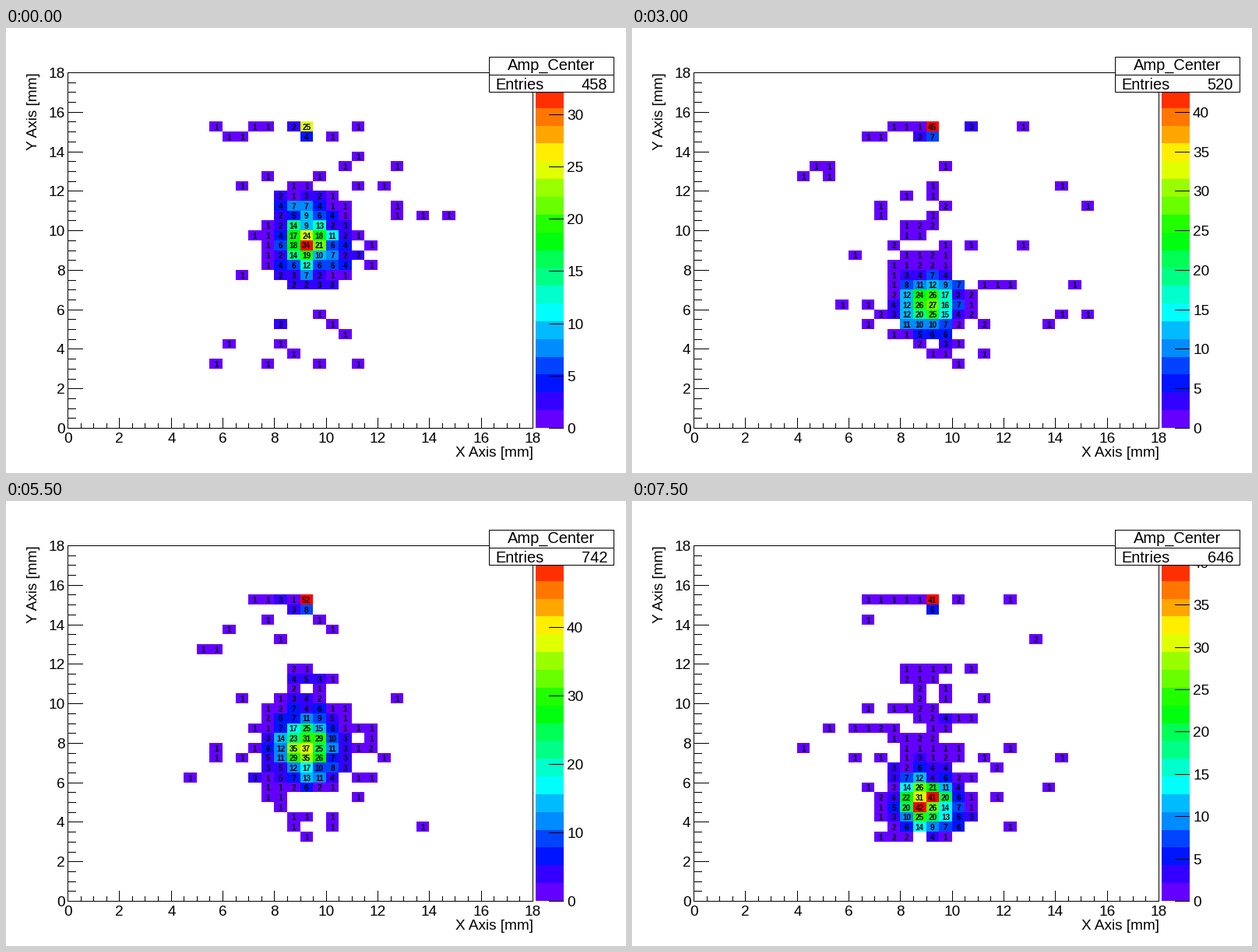
These frames come from a looping animation (796 px wide and 572 px high, 8 s). A matplotlib script:

```python
import colorsys

import matplotlib.pyplot as plt
import numpy as np
from matplotlib.animation import FuncAnimation
from matplotlib.colors import ListedColormap
from matplotlib.patches import Rectangle

W, H, DPI = 796, 572, 100
PX = 72 / DPI  # points per pixel
LEFT, RIGHT, TOP, BOTTOM = 79, 676, 57, 514
BINS, SPAN = 36, 18
BAR_X, BAR_W, LEVELS = 680, 36, 20
RUNS = 16

# Key points of the scan; the runs between them are interpolated.
KEY_RUN = [0, 1, 2, 6, 8, 9, 11, 14, 15]
BEAM_Y = [9.35, 9.4, 9.4, 6.25, 9.3, 9.25, 7.75, 5.75, 4.95]
ENTRIES = [458, 436, 518, 520, 615, 658, 742, 686, 646]
HOT = [25, 25, 37, 45, 45, 36, 52, 55, 41]
PEAK = [34, 24, 25, 27, 38, 47, 37, 43, 42]


def at(run, values):
    return float(np.interp(run, KEY_RUN, values))


def px_x(mm):
    return LEFT + mm * (RIGHT - LEFT) / SPAN


def px_y(mm):
    return BOTTOM - mm * (BOTTOM - TOP) / SPAN


def rainbow(level):
    step = int((level + 0.99) * 50 / LEVELS) + 1
    return colorsys.hls_to_rgb((280 - 5.6 * step) / 360, 0.5, 1)


PALETTE = ListedColormap([rainbow(k) for k in range(LEVELS)])
MESH = dict(cmap=PALETTE, vmin=-0.5, vmax=LEVELS - 0.5, zorder=1)
EDGES = np.arange(BINS + 1) * SPAN / BINS
EDGE_X = np.floor(px_x(EDGES) + 0.5)
EDGE_Y = np.floor(px_y(EDGES) + 0.5)
MIDS = (EDGES[:-1] + EDGES[1:]) / 2


def histogram(run):
    """Counts[row, column]: beam core, halo with upward trail, strays, hot cell."""
    rng = np.random.default_rng(100 + run)
    entries, hot, peak = (round(at(run, v)) for v in (ENTRIES, HOT, PEAK))
    cy = at(run, BEAM_Y)
    cx = 8.5 + 0.09 * cy
    sx, sy = 0.62, 0.45 + 0.05 * cy

    gx = np.exp(-((MIDS - cx) / sx) ** 2 / 2)
    gy = np.exp(-((MIDS - cy) / sy) ** 2 / 2)
    core = np.outer(gy, gx)
    core *= 0.6 * entries / core.sum()
    noise = 0.6 * np.sqrt(core) * rng.standard_normal(core.shape)
    counts = np.maximum(np.rint(core + noise), 0).astype(int)

    strays = 42
    halo = max(entries - counts.sum() - hot - hot // 6 - strays, 0)
    trail = halo // 4
    row_hits = strays // 6
    x = np.concatenate([
        rng.normal(cx, 0.95, halo - trail),
        rng.normal(9.1, 0.5, trail),
        rng.normal(9.2, 2.7, strays),
    ])
    y = np.concatenate([
        rng.normal(cy, 1.2, halo - trail),
        rng.uniform(cy, 11.8, trail),
        rng.uniform(15, 15.5, row_hits),
        rng.uniform(3, 15, strays - row_hits),
    ])
    keep = (x >= 4) & (x < 15.5) & (y >= 3) & (y < 15.5)
    cols, rows = (x[keep] * 2).astype(int), (y[keep] * 2).astype(int)
    np.add.at(counts, (rows, cols), 1)

    counts = np.minimum(counts, peak - 1)
    counts[int(cy * 2), int(cx * 2)] = peak
    counts[29:31, 17] = rng.integers(0, 4, 2)
    counts[30, 18], counts[29, 18] = hot, hot // 6
    return counts, entries


fig = plt.figure(figsize=(W / DPI, H / DPI), dpi=DPI, facecolor="white")
ax = fig.add_axes([0, 0, 1, 1])
ax.axis("off")


def label(x, y, text, size=19, ha="center", z=3, **kw):
    return ax.text(x, y, text, fontsize=size * PX, family="Liberation Sans",
                   ha=ha, va="baseline", zorder=z, **kw)


def line(x0, y0, x1, y1, z=2):
    return ax.plot([x0 + 0.5, x1 + 0.5], [y0 + 0.5, y1 + 0.5], color="black",
                   lw=PX, zorder=z, solid_capstyle="projecting",
                   snap=False)[0]


def box(x0, y0, x1, y1, fill, z):
    ax.add_patch(Rectangle((x0 + 0.5, y0 + 0.5), x1 - x0, y1 - y0, lw=PX,
                           ec="black", fc=fill, zorder=z, snap=False))


def draw_axes():
    box(LEFT, TOP, RIGHT, BOTTOM, "none", 2)
    for k in range(2 * SPAN + 1):
        mm, major = k / 2, k % 4 == 0
        x, y = round(px_x(mm)), round(px_y(mm))
        line(x, BOTTOM, x, BOTTOM - (13 if major else 6))
        line(LEFT, y, LEFT + (19 if major else 10), y)
        if major:
            label(x + 0.5, 533, f"{k // 2}")
            label(75.5, y + 7, f"{k // 2}", ha="right")
    label(677, 551, "X Axis [mm]", ha="right")
    label(40, 57, "Y Axis [mm]", ha="right", rotation=90,
          rotation_mode="anchor")


def draw_bar():
    edges = np.rint(np.linspace(BOTTOM, TOP, LEVELS + 1))
    ax.pcolormesh([BAR_X, BAR_X + BAR_W], edges,
                  np.arange(LEVELS)[:, None], **MESH)


def draw_stats():
    box(620, 37, 780, 82, "white", 5)
    line(620, 60, 780, 60, 6)
    label(700.5, 54, "Amp_Center", 20, z=6)
    label(628, 79, "Entries", 20, "left", z=6)
    return label(772, 79, "", 20, "right", z=6)


draw_axes()
draw_bar()
entries_text = draw_stats()
ax.set_xlim(0, W)
ax.set_ylim(H, 0)
live = []


def draw(run):
    while live:
        live.pop().remove()
    counts, entries = histogram(run)
    top = counts.max()

    level = np.minimum((0.01 + counts * LEVELS / top).astype(int), LEVELS - 1)
    live.append(ax.pcolormesh(EDGE_X, EDGE_Y,
                              np.ma.masked_where(counts == 0, level), **MESH))
    for row, col in np.argwhere(counts):
        live.append(label(px_x(MIDS[col]), px_y(MIDS[row]) + 4.3,
                          f"{counts[row, col]}", 10, weight="bold"))

    step = 2 if top <= 25 else 5 if top <= 50 else 10
    for value in range(0, top + 1, step):
        y = round(BOTTOM - (BOTTOM - TOP) * value / top)
        live.append(line(BAR_X + 17, y, BAR_X + BAR_W - 1, y))
        live.append(label(720, y + 7, f"{value}", ha="left"))

    entries_text.set_text(f"{entries}")
    return live


anim = FuncAnimation(fig, draw, frames=RUNS, interval=500,
                     init_func=lambda: draw(0), repeat=True, repeat_delay=0,
                     blit=False)
plt.show()
```
